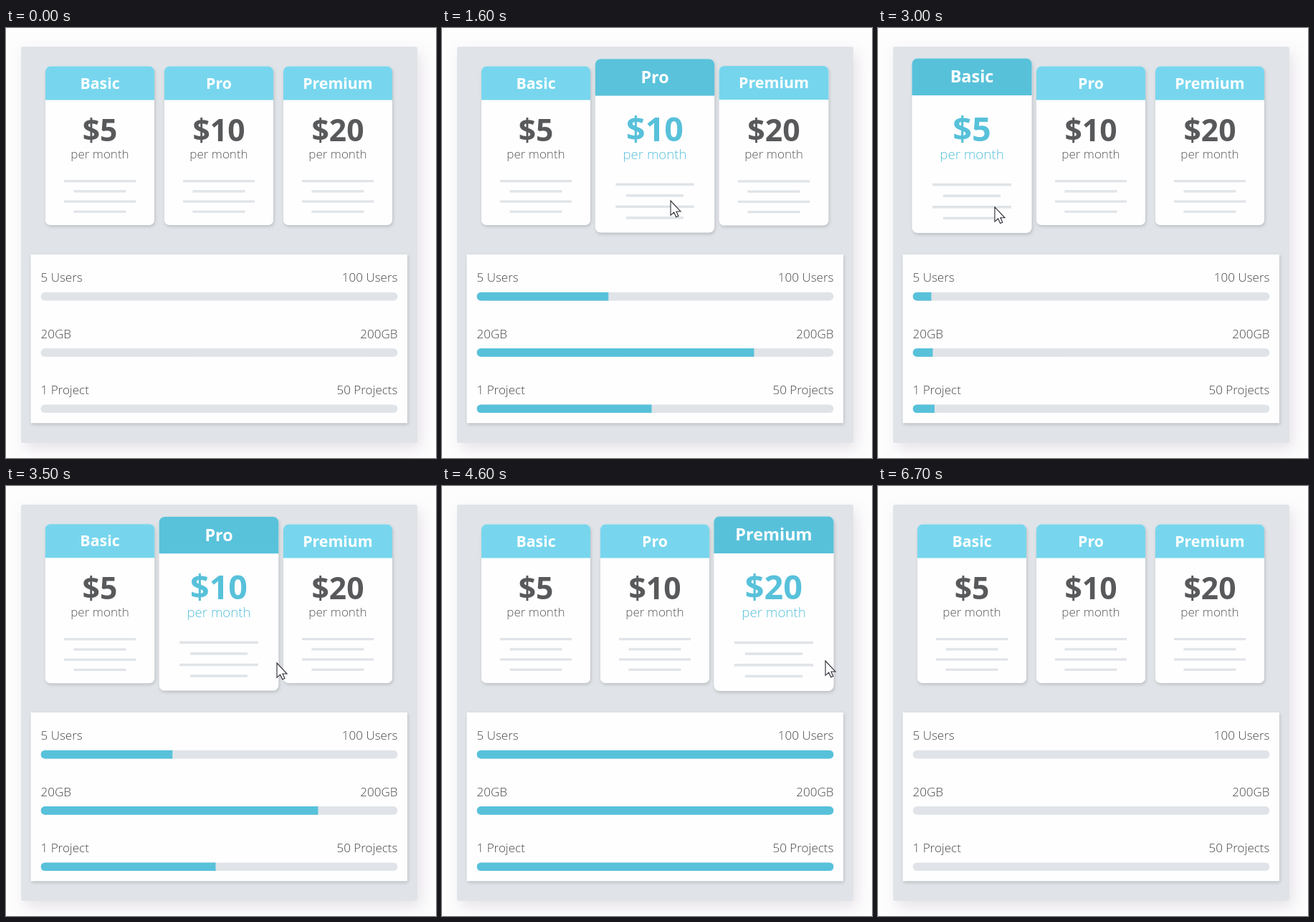
An HTML page for the animation above (6.8 s loop, 600x600 px).

```html
<!DOCTYPE html>
<html lang="en">
<head>
<meta charset="utf-8">
<title>Pricing cards</title>
<style>
html, body { margin: 0; width: 100%; height: 100%; overflow: hidden; background: #fefdfe; }
svg { display: block; width: 600px; height: 600px; font-family: "Open Sans", sans-serif; }
text { fill: #58595b; }
.board { fill: #e0e4e8; filter: drop-shadow(5px 8px 10px rgba(60, 50, 70, .13)); }
.sheet { fill: #fffeff; filter: drop-shadow(1px 2px 2px rgba(0, 0, 0, .17)); }
.title { font-size: 21.3px; font-weight: 700; fill: #fff; }
.price { font-size: 42.6px; font-weight: 700; }
.small { font-size: 17.04px; font-weight: 300; }
.label { fill: #48484a; }
.card text { text-anchor: middle; }
.card.on .price, .card.on .small { fill: #58c1da; }
.line, .track { fill: #e0e4e8; }
.fill { fill: #58c1da; }
</style>
</head>
<body>
<svg viewBox="0 0 600 600">
  <clipPath id="bar"><rect x="48.5" y="368.8" width="498" height="11.7" rx="5.85"/></clipPath>
  <rect class="board" x="21" y="26" width="553" height="553" rx="3"/>
  <g id="cards"></g>
  <rect class="sheet" x="34.5" y="316" width="525.5" height="235.3"/>
  <g id="bars"></g>
  <path id="cursor" fill="#fff" stroke="#2b2b33" stroke-width="1.1"
    d="M0 0V20.3L4.6 16.2L7.7 22.8L10.9 21.4L8 15H14Z"/>
</svg>
<script>
const LOOP = 6800, STEP = 100, FADE = 400, MID_Y = 164.4;

// hover: [enter, leave] times; fill: share of each bar
const plans = [
  { name: 'Basic', price: '$5', x: 131, hover: [[2280, 3190]], fill: [.052, .056, .061] },
  { name: 'Pro', price: '$10', x: 297, hover: [[1320, 2256], [3200, 3506]], fill: [.369, .777, .49] },
  { name: 'Premium', price: '$20', x: 463, hover: [[620, 1310], [3520, 4620]], fill: [1, 1, 1] }
];
const limits = [['5 Users', '100 Users'], ['20GB', '200GB'], ['1 Project', '50 Projects']];

// time, x, y of the pointer tip
const path = [
  [600, 548, 258], [1310, 386, 243], [1600, 319, 241], [2268, 212, 248], [2400, 184, 249],
  [2700, 148, 250], [2950, 150, 250], [3190, 212, 249], [3500, 378, 247], [3700, 430, 243],
  [3900, 458, 240], [4100, 464, 240], [4300, 466, 240], [4600, 535, 244]
];

const $ = id => document.getElementById(id);
const mix = (a, b, k) => a + (b - a) * k;

const line = (cx, y, w) => `<rect class="line" x="${cx - w / 2}" y="${y}" width="${w}" height="3.3"/>`;

$('cards').innerHTML = plans.map(({ name, price, x }) => `<g class="card">
  <rect class="sheet" x="${x - 76}" y="53.6" width="152" height="221.4" rx="7"/>
  <path class="head" d="M${x - 76} 100.4V60.6a7 7 0 0 1 7-7h138a7 7 0 0 1 7 7V100.4z"/>
  <text class="title" x="${x}" y="84.5">${name}</text>
  <text class="price" x="${x}" y="158.3">${price}</text>
  <text class="small" x="${x}" y="181.7">per month</text>
  ${[100, 73, 100, 73].map((w, i) => line(x, 212 + i * 14.2, w)).join('')}
</g>`).join('');

$('bars').innerHTML = limits.map(([low, high], i) => `<g transform="translate(0 ${i * 78.3})">
  <text class="small label" x="48.5" y="354.4">${low}</text>
  <text class="small label" x="546.5" y="354.4" text-anchor="end">${high}</text>
  <g clip-path="url(#bar)">
    <rect class="track" x="48" y="368" width="499" height="13"/>
    <rect class="fill" x="48.5" y="368" width="0" height="13"/>
  </g>
</g>`).join('');

const cards = document.querySelectorAll('.card');
const heads = document.querySelectorAll('.head');
const fills = document.querySelectorAll('.fill');

// cubic-bezier(.25, .1, .25, 1)
function ease(x) {
  if (x <= 0) return 0;
  if (x >= 1) return 1;
  const curve = (a, b, s) => 3 * a * s * (1 - s) ** 2 + 3 * b * s * s * (1 - s) + s ** 3;
  let lo = 0, hi = 1;
  for (let i = 0; i < 24; i++) {
    const s = (lo + hi) / 2;
    if (curve(.25, .25, s) < x) lo = s; else hi = s;
  }
  return curve(.1, 1, lo);
}

function lift(hover, t) {
  return hover.reduce((sum, [enter, leave]) => {
    const peak = ease((Math.min(t, leave) - enter) / FADE);
    return sum + peak * (1 - ease((t - leave) / FADE));
  }, 0);
}

function drawCursor(t) {
  const next = path.findIndex(p => p[0] >= t);
  const shown = t >= path[0][0] && next >= 0;
  $('cursor').style.display = shown ? '' : 'none';
  if (!shown) return;
  const a = path[Math.max(0, next - 1)], b = path[next];
  const k = a === b ? 0 : (t - a[0]) / (b[0] - a[0]);
  $('cursor').setAttribute('transform', `translate(${mix(a[1], b[1], k)} ${mix(a[2], b[2], k)})`);
}

function draw(t) {
  let active = null;
  plans.forEach((plan, i) => {
    const on = plan.hover.some(([enter, leave]) => t >= enter && t < leave);
    const k = lift(plan.hover, t);
    if (on) active = plan;
    cards[i].classList.toggle('on', on);
    cards[i].setAttribute('transform',
      `translate(${plan.x} ${MID_Y}) scale(${1 + k * .1}) translate(${-plan.x} ${-MID_Y})`);
    heads[i].style.fill = `rgb(${mix(119, 88, k)}, ${mix(214, 193, k)}, ${mix(238, 218, k)})`;
  });
  fills.forEach((bar, i) => bar.setAttribute('width', active ? active.fill[i] * 498 : 0));
  drawCursor(t);
}

const start = performance.now();
function tick() {
  const t = (performance.now() - start) % LOOP;
  draw(Math.floor(t / STEP) * STEP);
  requestAnimationFrame(tick);
}
tick();
</script>
</body>
</html>
```
